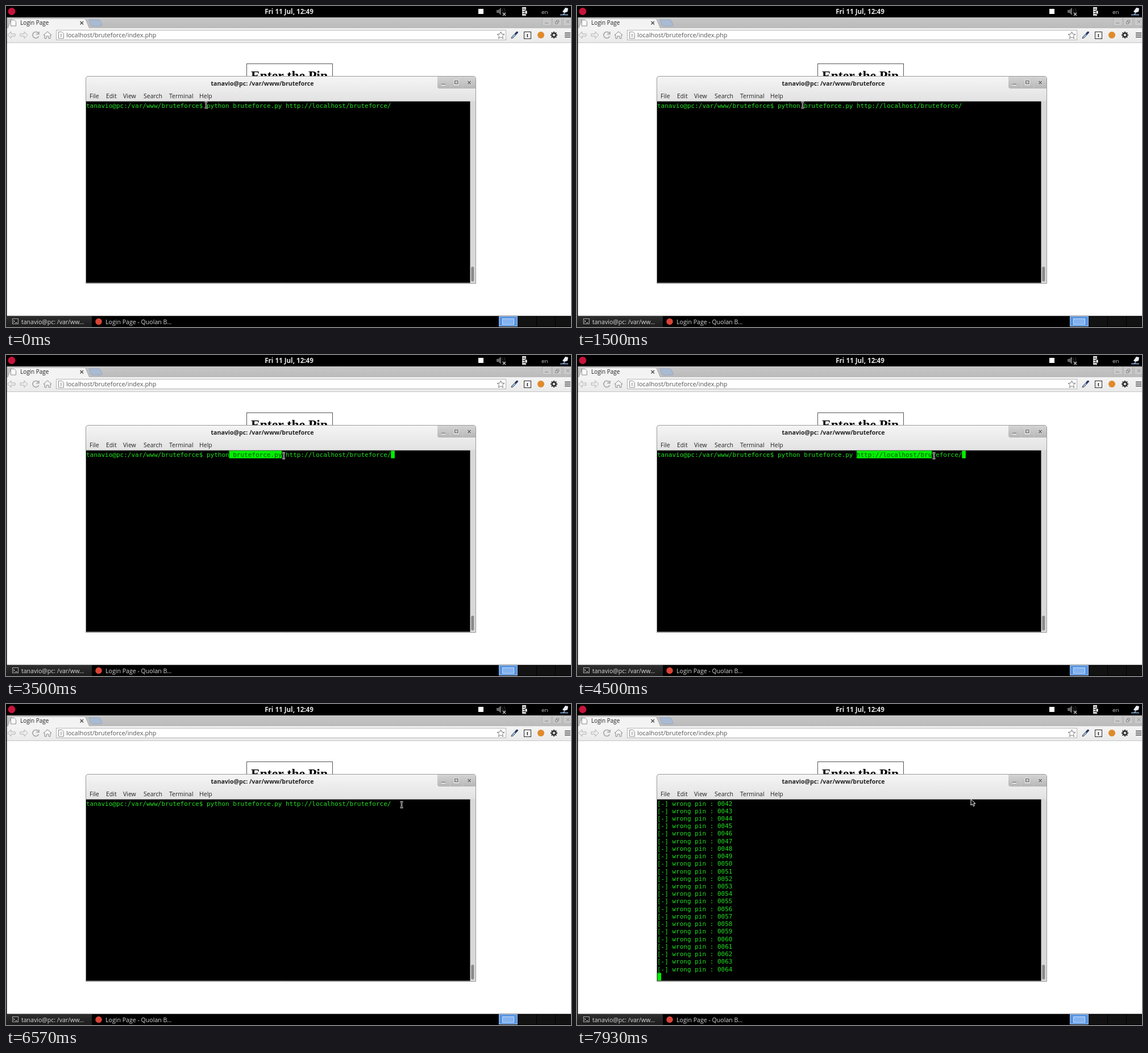
These frames come from a looping animation (994x564 px, 8000 ms). An HTML page with a canvas:

```html
<!DOCTYPE html>
<html lang="en">
<head>
<meta charset="utf-8">
<title>Terminal session</title>
<style>
html, body { margin: 0; width: 100%; height: 100%; overflow: hidden; background: #fff; }
canvas { display: block; }
</style>
</head>
<body>
<canvas id="stage" width="994" height="564"></canvas>
<script>
const ctx = document.getElementById('stage').getContext('2d');
const LOOP = 8000, STEP = 1000 / 14;
const UI = '"Open Sans", sans-serif';
const MONO = '11px "DejaVu Sans Mono", monospace';
const LEFT = 141, TOP = 168.2, CHAR = 6.62, ROW = 13.23;
const GREEN = '#20e020', BRIGHT = '#00f000';
const USER = 'tanavio@pc:';
const COMMAND = USER + '/var/www/bruteforce$ python bruteforce.py http://localhost/bruteforce/';
const ENTER = 7565;

// Pointer way points: time, x, y
const PATH = [
  [0, 352, 174], [70, 346, 174], [1000, 344, 174], [1290, 397, 174], [2290, 397, 174],
  [2570, 430, 175], [3070, 462, 176], [3430, 488, 177], [3900, 492, 177], [4200, 497, 177],
  [4500, 628, 177], [5000, 686, 177], [5200, 688, 177], [5570, 696, 177], [LOOP, 696, 177]
];
// Text selections: start time, end time, first column
const SELECTIONS = [[2300, 3930, 38], [4000, 5140, 53]];

function rect(x, y, w, h, fill, stroke) {
  if (fill) { ctx.fillStyle = fill; ctx.fillRect(x, y, w, h); }
  if (stroke) { ctx.strokeStyle = stroke; ctx.lineWidth = 1; ctx.strokeRect(x + .5, y + .5, w - 1, h - 1); }
}
function shade(y0, y1, from, to) {
  const g = ctx.createLinearGradient(0, y0, 0, y1);
  g.addColorStop(0, from);
  g.addColorStop(1, to);
  return g;
}
function path(d, fill, stroke, width = 1) {
  const p = new Path2D(d);
  if (fill) { ctx.fillStyle = fill; ctx.fill(p); }
  if (stroke) { ctx.strokeStyle = stroke; ctx.lineWidth = width; ctx.stroke(p); }
}
function circle(x, y, r, fill, stroke, width = 1) {
  ctx.beginPath();
  ctx.arc(x, y, r, 0, 7);
  if (fill) { ctx.fillStyle = fill; ctx.fill(); }
  if (stroke) { ctx.strokeStyle = stroke; ctx.lineWidth = width; ctx.stroke(); }
}
function text(s, x, y, font, color, align = 'left') {
  ctx.font = font;
  ctx.fillStyle = color;
  ctx.textAlign = align;
  ctx.fillText(s, x, y);
}

function drawTopBar() {
  rect(0, 0, 994, 20, '#000');
  circle(10, 9.5, 6.5, '#c8143c');
  text('Fri 11 Jul, 12:49', 498, 14.2, 'bold 11.6px ' + UI, '#e6e6e6', 'center');
  rect(831, 5, 9, 9, '#fff');
  path('M863 7h3l5 -4v13l-5 -4h-3z', '#666');
  path('M873 6q3 4 0 7M876 4q4 6 0 9', null, '#444');
  path('M874 12l5 5M879 12l-5 5', null, '#ccc', 1.3);
  rect(908, 2, 7, 15, '#ddd');
  path('M909 5.5h5M909 9.5h5M909 13.5h5', null, '#222');
  path('M913 8h4v6h-4z', '#fff', '#111');
  text('en', 942, 14, '9.8px ' + UI, '#c8c8c8');
  path('M979 10l5 -7 5 1 -1 6 -6 2z', '#e8eef6');
  path('M975 15.5h5l3 -3M981 15.5h8', null, '#8fb2e0', 1.6);
}

function drawBrowser() {
  rect(0, 20, 994, 525, '#fff');
  rect(0, 20, 994, 20, shade(20, 40, '#c6c6c6', '#bababa'));
  path('M3 39.5L9 23q1 -1 3 -1h125q2 0 3 1l7 16.5z', '#f3f3f3', '#aaa');
  path('M146 24h17q2 0 3 2l3 7q0 2 -2 2h-14q-3 0 -4 -2z', '#a9bbd3', '#98a8c0');
  text('Login Page', 25, 33.4, '9.95px ' + UI, '#222');
  path('M8.5 24.5h6l3 3v7.5h-9z', '#fff', '#888');
  path('M130.5 27l5.5 5.5M136 27l-5.5 5.5', null, '#444', 1.3);
  for (const x of [943, 961, 980]) rect(x, 20, 17, 15, '#c9c9c9', '#b4b4b4');
  path('M948 30h6M966.5 27.5h4v4h-4zM968.5 27v-2h4v4h-2M986 25l5 5M991 25l-5 5', null, '#888');

  rect(0, 39, 994, 26, shade(39, 65, '#f4f4f4', '#eaeaea'));
  rect(0, 64, 994, 1, '#c4c4c4');
  path('M9 45l-6 6 6 6v-4h7v-4h-7zM32 45l6 6 -6 6v-4h-7v-4h7z', '#eee', '#b0b0b0');
  path('M57 48A5.5 5.5 0 1 0 57.5 53M58 45v4.5h-5', null, '#a4a4a4', 1.6);
  path('M66 51l7 -6 7 6h-2v6h-3v-4h-4v4h-3v-6z', '#f6f6f6', '#888');
  rect(88, 42, 792, 18, '#fff', '#b4b4b4');
  path('M92.5 45.5h6l3 3v8.5h-9z', '#fff', '#888');
  path('M95 49.5h4M95 51.5h4M95 53.5h4', null, '#aaa');
  text('localhost/bruteforce/index.php', 106, 55, '10.95px ' + UI, '#555');
  path('M870.5 45l1.8 4.3 4.7 .4 -3.6 3 1.2 4.6 -4.1 -2.5 -4.1 2.5 1.2 -4.6 -3.6 -3 4.7 -.4z', '#fff', '#777');
  path('M889 57l1 -3 5 -5 2 2 -5 5z', '#9fc3e6', '#445');
  path('M895 48l3 -3q2 -1 3 1 0 2 -1 2l-3 3z', '#223a66');
  rect(911, 45, 13, 13, '#fff', '#222');
  text('t', 917.5, 55, 'bold 10px "Liberation Serif", serif', '#222', 'center');
  circle(941, 51, 6, '#e08a2c');
  for (let i = 0; i < 8; i++) {
    const a = i * Math.PI / 4;
    path(`M964 51l${6 * Math.cos(a)} ${6 * Math.sin(a)}`, null, '#333', 2.4);
  }
  circle(964, 51, 3.2, '#eee', '#333', 2.2);
  path('M983 47.5h10M983 51h10M983 54.5h10', null, '#444', 1.7);

  rect(423, 101, 152, 60, '#fff', '#555');
  text('Enter the Pin', 498.5, 130, 'bold 23.6px "Liberation Serif", serif', '#000', 'center');
  rect(0, 20, 1.6, 525, '#111');
}

function drawTaskbar() {
  rect(0, 544.5, 994, 20, '#000');
  rect(0, 545, 151, 19, shade(545, 564, '#2e2e2e', '#1c1c1c'));
  rect(11, 549, 11, 10, '#222', '#aaa');
  path('M13 552l2 2 -2 2M16.5 556.5h3', null, '#ddd');
  text(USER + ' /var/ww...', 27, 558.5, '10.55px ' + UI, '#d8d8d8');
  circle(163, 554.5, 5.7, '#db4437');
  text('Login Page - Quolan B...', 175, 558.5, '10.6px ' + UI, '#d8d8d8');
  rect(867, 545, 33, 18, '#5794e0', '#a4c6f4');
  rect(873, 549, 21, 11, '#83b2f0', '#c6ddfb');
  for (const x of [901, 934, 967]) rect(x, 546, 32, 17, '#121212');
}

function drawWindow() {
  path('M140.5 487.5V128q0 -4.5 4.5 -4.5H822q4.5 0 4.5 4.5V487.5z', shade(123, 168, '#f5f5f5', '#e2e2e2'), '#9a9a9a');
  path('M759 124H822q4 0 4 4V145H763q-4 0 -4 -4z', shade(124, 145, '#d4d4d4', '#b6b6b6'));
  path('M781.5 125v20M803.5 125v20', null, '#c8c8c8');
  path('M766 138.5h7', null, '#fff', 1.8);
  path('M789 131.5h6.5v6.5h-6.5zM811.5 131l7 7M818.5 131l-7 7', null, '#fff', 2);
  path('M766 137.5h7M789.5 131.5h5.5v5.5h-5.5zM812 131.5l6 6M818 131.5l-6 6', null, '#555', 1.2);
  text(USER + ' /var/www/bruteforce', 451, 139.7, 'bold 10.57px ' + UI, '#222', 'center');
  const menu = { File: 147, Edit: 176, View: 206, Search: 242, Terminal: 287, Help: 340 };
  for (const name in menu) text(name, menu[name], 162, '10.5px ' + UI, '#222');
  rect(816, 167, 10, 320, '#d9d9d9');
  rect(LEFT, 167.6, 675.5, 318.8, '#000');
  path('M820.8 461v20', null, '#8a8a8a', 5);
  circle(820.8, 460.5, 2.5, '#8a8a8a');
  circle(820.8, 481.5, 2.5, '#8a8a8a');
}

function pointerAt(t) {
  const i = PATH.findIndex(p => p[0] > t);
  const [t0, x0, y0] = PATH[i - 1], [t1, x1, y1] = PATH[i];
  const k = (t - t0) / (t1 - t0);
  return [x0 + (x1 - x0) * k, y0 + (y1 - y0) * k];
}

function drawTerminal(t, mouseX) {
  const entered = t >= ENTER;
  const tried = Math.max(0, Math.floor((t - 7640) / STEP * 16.25));
  const lines = [COMMAND];
  for (let pin = 0; pin < tried; pin++) lines.push('[-] wrong pin : ' + String(pin).padStart(4, '0'));
  const visible = lines.slice(-23);
  visible.forEach((line, row) => text(line, LEFT, TOP + 10.3 + row * ROW, MONO, GREEN));

  for (const [start, end, from] of SELECTIONS) {
    const to = Math.min(81, Math.floor((mouseX - LEFT) / CHAR));
    if (t < start || t >= end || to <= from) continue;
    rect(LEFT + from * CHAR, TOP, (to - from) * CHAR, ROW, BRIGHT);
    text(COMMAND.slice(from, to), LEFT + from * CHAR, TOP + 10.3, MONO, '#064d06');
  }
  if (entered) rect(LEFT + .5, TOP + visible.length * ROW, CHAR, ROW, BRIGHT);
  else if (t % 1200 >= 600) rect(LEFT + 81 * CHAR, TOP, CHAR, ROW, BRIGHT);
}

function drawPointer(t, x, y) {
  ctx.save();
  if (t >= ENTER) {
    ctx.translate(692.5, 167);
    path('M.5 .5v10.5l2.5 -2.3 2 4 2 -1 -2 -3.7h3.5z', '#000', '#fff');
  } else {
    ctx.translate(x, y);
    const beam = 'M-2.5 -5h1.5l1 1 1 -1h1.5M0 -4v8M-2.5 5h1.5l1 -1 1 1h1.5';
    path(beam, null, '#ddd', 2.6);
    path(beam, null, '#222', 1);
  }
  ctx.restore();
}

function frame(now) {
  const t = Math.floor((now % LOOP + 5) / STEP) * STEP % LOOP;
  const [x, y] = pointerAt(t);
  drawBrowser();
  drawTopBar();
  drawTaskbar();
  drawWindow();
  drawTerminal(t, x);
  drawPointer(t, x, y);
  requestAnimationFrame(frame);
}
requestAnimationFrame(frame);
</script>
</body>
</html>
```
